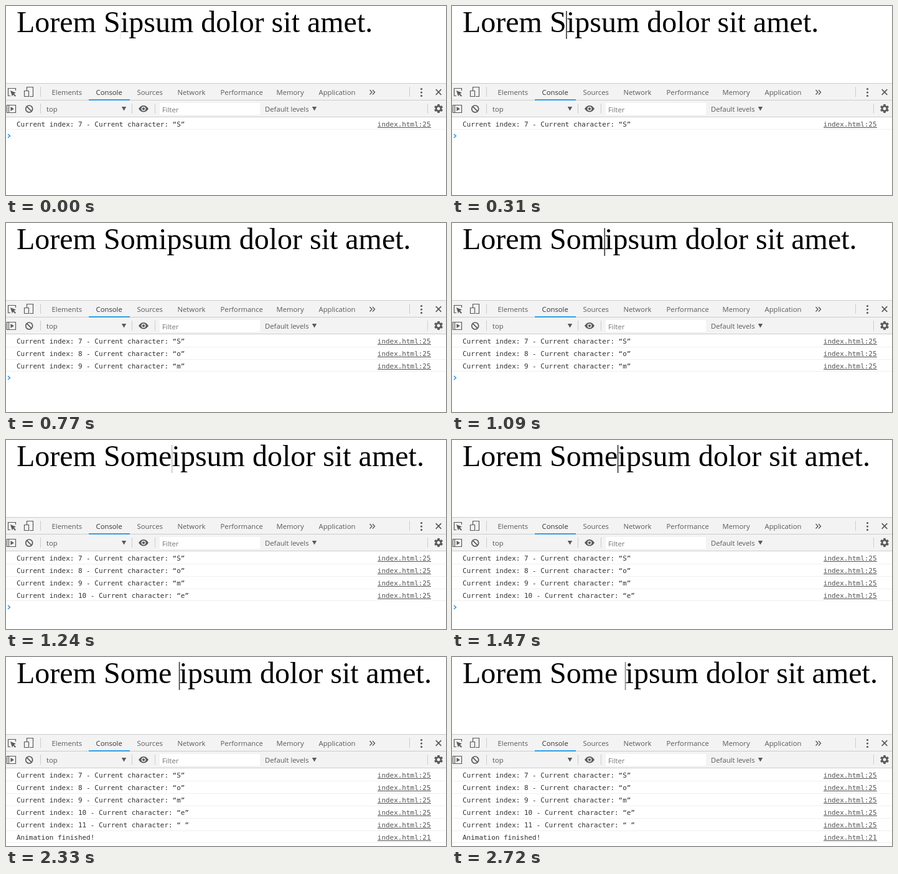
Write an HTML page with a canvas that moves like this. It is 707 px wide and 304 px high and loops after 2.8 s.

```html
<!DOCTYPE html>
<html lang="en">
<head>
<meta charset="utf-8">
<title>Typing with console log</title>
<style>
  html, body { margin: 0; width: 100%; height: 100%; overflow: hidden; background: #fff; }
  canvas { display: block; }
</style>
</head>
<body>
<canvas id="stage" width="707" height="304"></canvas>
<script>
const c = document.getElementById('stage').getContext('2d');
const LOOP = 2800, STEP = 77.7, TYPE_GAP = 398, LEAD = 20;
const BEFORE = 'Lorem ', TYPED = 'Some ', AFTER = 'ipsum dolor sit amet.';
const SERIF = '48px "Liberation Serif", serif';
const UI = '11.3px "Open Sans", sans-serif';
const MONO = '10.96px "DejaVu Sans Mono", monospace';
const GREY = '#5a5a5a';

function rect(x, y, w, h, color) {
  c.fillStyle = color;
  c.fillRect(x, y, w, h);
}

function text(str, x, y, font, color) {
  c.font = font;
  c.fillStyle = color;
  c.fillText(str, x, y);
}

function stroke(d, width = 1.2, color = GREY) {
  c.strokeStyle = color;
  c.lineWidth = width;
  c.stroke(new Path2D(d));
}

function fill(d, color = GREY) {
  c.fillStyle = color;
  c.fill(new Path2D(d));
}

function circle(x, y, r, color) {
  c.fillStyle = color;
  c.beginPath();
  c.arc(x, y, r, 0, 2 * Math.PI);
  c.fill();
}

function gear(x, y) {
  c.save();
  c.translate(x, y);
  for (let i = 0; i < 6; i++) {
    c.rotate(Math.PI / 3);
    rect(-1.8, -7, 3.6, 7, GREY);
  }
  c.restore();
  circle(x, y, 5.3, GREY);
  circle(x, y, 2.5, '#f3f3f3');
}

function drawTabs() {
  rect(0, 124, 707, 55, '#f3f3f3');
  for (const y of [124, 151, 178]) rect(0, y, 707, 1, '#ccc');
  rect(133, 150, 66, 2, '#2f9fe8');
  const tabs = { Elements: 73, Console: 144, Sources: 210, Network: 275, Performance: 344, Memory: 434, Application: 502 };
  for (const [name, x] of Object.entries(tabs))
    text(name, x + 0.5, 143, UI, name === 'Console' ? '#333' : GREY);
  for (const x of [55, 648]) rect(x, 130, 1, 16, '#ccc');

  stroke('M7 144.5H3.5V132.5H15.5V136');
  fill('M7 136L16 139.6L12.7 141L16 144.3L14.6 145.7L11.3 142.4L10 145.5Z');
  stroke('M33.5 136V130.5H43.5V145.5H38M29.5 136.5H36.5V145.5H29.5Z');
  stroke('M584.5 135L588 138.7L584.5 142.4M589 135L592.5 138.7L589 142.4', 1.4);
  for (const y of [133.5, 139, 144.5]) circle(667.5, y, 1.6, GREY);
  stroke('M690.7 134.2L699.3 142.8M699.3 134.2L690.7 142.8', 1.7);
}

function drawFilterBar() {
  stroke('M1.5 159.5H15.5V171.5H1.5ZM4.5 159.5V171.5');
  fill('M7.5 162L12.8 165.5L7.5 169Z');
  stroke('M31.7 165.5a5.5 5.5 0 1 0 11 0a5.5 5.5 0 1 0 -11 0M33.4 161.7L41 169.3', 1.7);
  for (const x of [55, 202, 239, 677]) rect(x, 157, 1, 16, '#ccc');
  text('top', 65, 170, UI, GREY);
  fill('M185.8 162H193.2L189.5 168.5Z');
  fill('M213 165.3Q216.5 160 221 160T229 165.3Q225.5 170.6 221 170.6T213 165.3Z');
  circle(221, 165.3, 3.5, '#f3f3f3');
  circle(221, 165.3, 2.1, GREY);
  rect(247, 156, 161, 19, '#fff');
  text('Filter', 251, 170.5, UI, '#757575');
  text('Default levels', 416, 170, UI, GREY);
  fill('M491.8 162H499.2L495.5 168.5Z');
  gear(695, 165);
}

function logRow(row, message, link, last) {
  const y = 194 + row * 20;
  text(message, 17, y, MONO, '#303030');
  text(link, 596.8, y, MONO, '#545454');
  rect(597, y + 1, 86, 1, '#545454');
  rect(0, y + (last ? 4 : 5), 707, 1, '#f0f0f0');
}

function drawConsole(count) {
  const done = count === TYPED.length;
  for (let i = 0; i < count; i++)
    logRow(i, `Current index: ${i + 7} - Current character: “${TYPED[i]}”`, 'index.html:25', !done && i === count - 1);
  if (done) return logRow(count, 'Animation finished!', 'index.html:21', true);
  const y = 189 + count * 20;
  stroke(`M3 ${y - 3}L6.3 ${y}L3 ${y + 3}`, 1.6, '#2f94dc');
}

function drawHeading(count, opacity) {
  const start = BEFORE + TYPED.slice(0, count);
  text(start, 17, 42, SERIF, '#000');
  const x = 17 + c.measureText(start).width;
  text(AFTER, x + 0.3, 42, SERIF, '#000');
  c.globalAlpha = opacity;
  rect(x - 0.5, 8, 1.6, 45, '#333');
  c.globalAlpha = 1;
}

// One-second blink: quarter fade in, half hold, quarter fade out.
function blink(ms) {
  const p = ms % 1000 / 250;
  return Math.min(1, p, 4 - p);
}

function draw(now) {
  const t = Math.floor((now % LOOP + 9.5) / STEP) % 36 * STEP;
  const index = Math.min(TYPED.length - 1, Math.floor((t + LEAD) / TYPE_GAP));
  rect(0, 0, 707, 304, '#fff');
  drawHeading(index + 1, blink(t + LEAD - index * TYPE_GAP));
  drawTabs();
  drawFilterBar();
  drawConsole(index + 1);
}

let begin;
function tick(now) {
  begin ??= now;
  draw(now - begin);
  requestAnimationFrame(tick);
}
requestAnimationFrame(tick);
</script>
</body>
</html>
```
